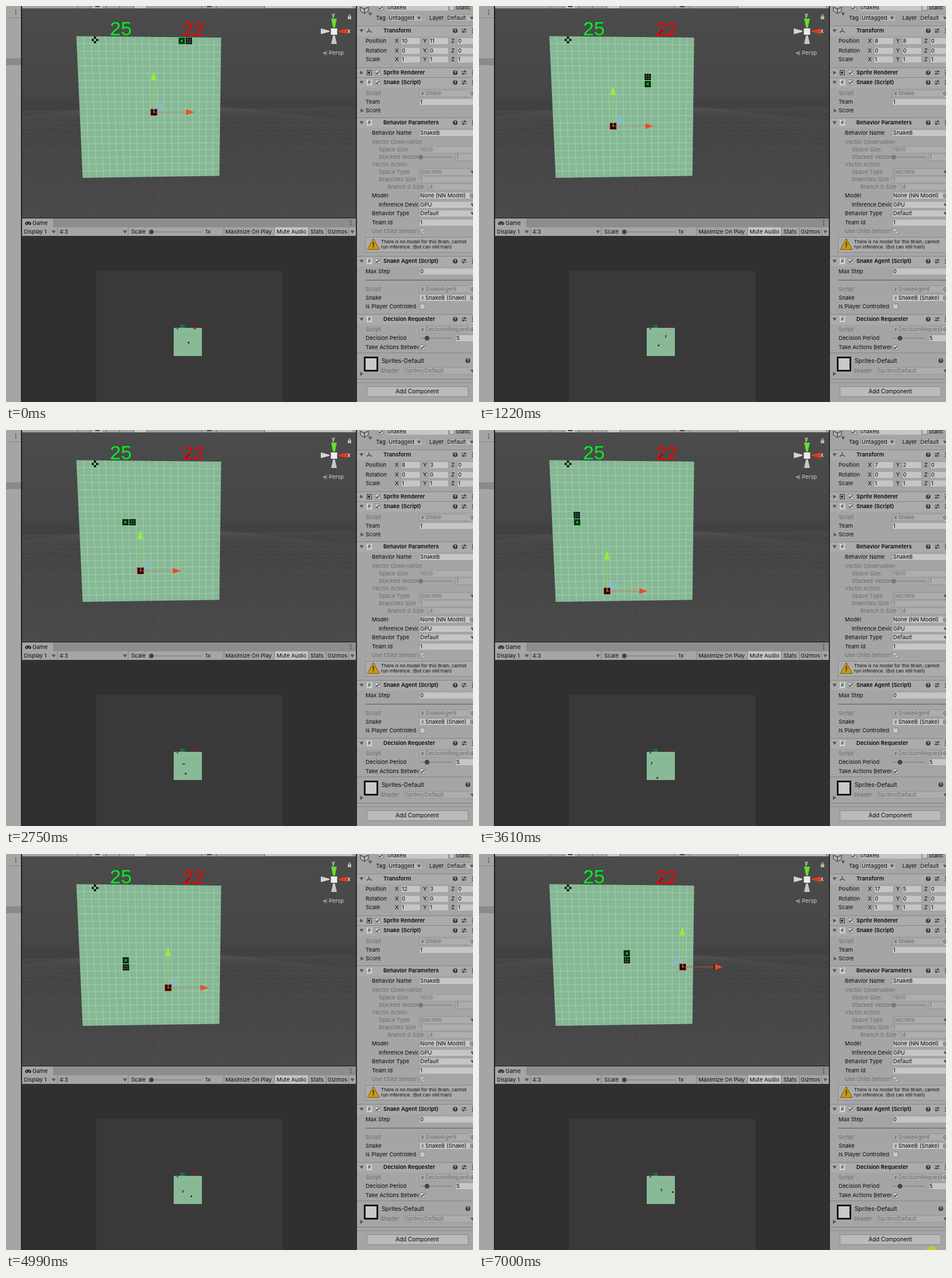
An HTML page with a canvas that plays this animation: 813 by 689 pixels, repeating every 7.08 s.

```html
<!DOCTYPE html>
<html lang="en">
<head>
<meta charset="utf-8">
<title>Snake training in an editor</title>
<style>
  html, body { margin: 0; width: 100%; height: 100%; overflow: hidden; background: #313131; }
  canvas { display: block; }
</style>
</head>
<body>
<canvas id="stage" width="813" height="689"></canvas>
<script>
const stage = document.getElementById('stage');
let g = stage.getContext('2d');
const LOOP = 7080, STEP = 77, PANEL = '#a5a5a5', FIELD = '#c6c6c6', INK = '#0b0b0b', DIM = '#6b6b6b';

// Waypoints: [step, column, row, tail dx, tail dy]
const redPath = [
  [-1, 10, 11], [0, 10, 9], [3, 10, 0], [4, 9, 3], [6, 9, 11], [7, 10, 11], [8, 10, 11],
  [10, 10, 10], [14, 8, 9], [20, 8, 3], [23, 9, 0], [24, 8, 1], [29, 8, 0], [35, 8, 4],
  [42, 9, 4], [46, 7, 2], [47, 7, 1], [51, 8, 2], [59, 10, 4], [64, 12, 3], [65, 12, 5],
  [69, 14, 2], [71, 15, 3], [78, 16, 1], [79, 17, 3], [85, 16, 5], [90, 17, 5], [91, 18, 8]
];
const greenPath = [
  [0, 14, 19, 1, 0], [8, 14, 17, 1, 0], [16, 13, 13, 0, 1], [24, 11, 10, 1, 0], [32, 7, 11, 1, 0],
  [40, 4, 10, 1, 0], [44, 2, 12, 0, 1], [47, 3, 11, 0, 1], [51, 3, 10, 0, 1], [60, 5, 8, -1, 0],
  [65, 6, 9, 0, -1], [71, 10, 7, -1, 0], [79, 10, 6, 1, 0], [86, 8, 8, 1, 0], [91, 10, 10, 0, -1]
];

function along(path, n) {
  let i = path.length - 1;
  while (i > 0 && path[i][0] > n) i--;
  const a = path[i], b = path[i + 1] || a;
  const k = b === a ? 0 : (n - a[0]) / (b[0] - a[0]);
  return {
    x: Math.round(a[1] + (b[1] - a[1]) * k),
    y: Math.round(a[2] + (b[2] - a[2]) * k),
    tx: a[3], ty: a[4]
  };
}

// Grid coordinates to the tilted board
function project(col, row) {
  const u = col / 20, v = row / 20 * (1 - .054 * (1 - row / 20));
  const left = 133.5 - 11 * v, right = 371.5 + 3 * v;
  const bottom = 299 - 3.5 * u, top = 52.5 + 2.5 * u;
  return [left + (right - left) * u + 3 * u * (1 - u), bottom + (top - bottom) * v];
}

function rect(x, y, w, h, color) { g.fillStyle = color; g.fillRect(x, y, w, h); }
function frame(x, y, w, h, color, width = 1) {
  g.strokeStyle = color; g.lineWidth = width; g.strokeRect(x, y, w, h);
}
function poly(color, ...pts) {
  g.fillStyle = color; g.beginPath();
  pts.forEach(p => g.lineTo(...p));
  g.closePath(); g.fill();
}
function line(a, b, color, width = 1) {
  g.strokeStyle = color; g.lineWidth = width;
  g.beginPath(); g.moveTo(...a); g.lineTo(...b); g.stroke();
}
function disc(x, y, r, color) {
  g.fillStyle = color; g.beginPath(); g.arc(x, y, r, 0, 7); g.fill();
}
function text(s, x, y, color = INK, size = 9.6, weight = 400, align = 'left') {
  g.font = `${weight} ${size}px Inter, sans-serif`;
  g.textAlign = align; g.textBaseline = 'middle'; g.fillStyle = color;
  g.fillText(s, x, y + .5);
}
function score(s, x, y, color, size) {
  g.font = `${size}px "Liberation Sans", sans-serif`;
  g.textAlign = 'left'; g.textBaseline = 'alphabetic'; g.fillStyle = color;
  g.fillText(s, x, y);
}
function field(x, y, w, value, color = INK, fill = FIELD) {
  rect(x, y - 6.5, w, 13, fill);
  frame(x + .5, y - 6, w - 1, 12, '#929292');
  const script = value.startsWith('# ');
  if (script) text('#', x + 4, y, '#4d6b56', 7, 600);
  text(value.replace('# ', ''), x + (script ? 11 : 2), y, color);
}
function arrow(x, y, open = true, color = '#555') {
  if (open) poly(color, [x - 3.5, y - 2.5], [x + 3.5, y - 2.5], [x, y + 3]);
  else poly(color, [x - 2.5, y - 3.5], [x + 3, y], [x - 2.5, y + 3.5]);
}
function check(x, y, on = true, color = INK) {
  rect(x - 4.5, y - 4.5, 9, 9, FIELD);
  frame(x - 4.5, y - 4.5, 9, 9, '#858585');
  if (!on) return;
  line([x - 3, y], [x - 1, y + 2.5], color, 1.2);
  line([x - 1, y + 2.5], [x + 3, y - 2.5], color, 1.2);
}
function dots(x, y) { for (const d of [-3.5, 0, 3.5]) rect(x - .8, y + d - .8, 1.6, 1.6, '#333'); }
function help(x, y) { disc(x, y, 4, '#333'); text('?', x, y, '#ddd', 7, 700, 'center'); }
function slider(x, y, w, knob, color = '#444') {
  line([x, y], [x + w, y], '#777', 1.2);
  disc(knob, y, 4, color);
}

function header(title, y, { open = true, box = true } = {}) {
  rect(611, y - 9, 202, 1, '#858585');
  rect(611, y - 8, 202, 17, '#ababab');
  arrow(619, y, open);
  if (box) check(647, y);
  if (/Script|Behavior|Decision/.test(title)) {
    rect(628, y - 5, 9, 10, '#d2d8d2');
    text('#', 632.5, y, '#356b45', 8.5, 700, 'center');
  } else if (box) {
    frame(628.5, y - 4, 8, 8, '#333');
    disc(632, y, 2.2, '#333');
  } else {
    line([632, y - 5], [632, y], '#3c7a3c', 1.5);
    line([632, y], [637, y + 3], '#a33', 1.5);
    line([632, y], [628, y + 3], '#335', 1.5);
  }
  text(title, 657, y, INK, 9.6, 600);
  help(782, y);
  line([793, y - 2], [802, y - 2], '#333'); line([793, y + 2], [802, y + 2], '#333');
  rect(798, y - 4, 1.5, 4, '#333'); rect(795, y, 1.5, 4, '#333');
  dots(812, y);
}

function inspector() {
  rect(610, 0, 203, 689, PANEL);
  rect(609, 0, 2, 689, '#2a2a2a');
  poly('#b5b5b5', [617, 2], [624, -2], [631, 2], [631, 9], [624, 13], [617, 9]);
  for (const p of [[617, 2], [631, 2], [624, 13]]) line([624, 5], p, '#333', 1.3);
  line([617, 2], [617, 9], '#333'); line([617, 9], [624, 13], '#333');
  line([624, 13], [631, 9], '#333'); line([631, 9], [631, 2], '#333');
  arrow(634, 14);
  check(652, 3); field(661, 3, 110, 'SnakeB');
  check(776, 3, false); text('Static', 783, 3);
  text('Tag', 644, 21); field(664, 21, 62, 'Untagged', INK, '#b5b5b5'); arrow(719, 21);
  text('Layer', 737, 21); field(766, 21, 55, 'Default', INK, '#b5b5b5'); arrow(811, 21);

  header('Transform', 43, { box: false });
  header('Sprite Renderer', 116, { open: false });
  header('Snake (Script)', 133);
  header('Behavior Parameters', 203, { box: false });
  header('Snake Agent (Script)', 444);
  header('Decision Requester', 545, { box: false });

  [['Position', 61], ['Rotation', 78], ['Scale', 93]].forEach(([name, y]) => {
    text(name, 626, y);
    ['X', 'Y', 'Z'].forEach((axis, i) => {
      text(axis, 677 + 49 * i, y);
      field(687 + 49 * i, y, 35, name === 'Scale' ? '1' : '0');
    });
  });

  // [label, x, y, value, disabled, value x]
  const rows = [
    ['Script', 626, 152, '# Snake', 1], ['Team', 626, 167, '1'], ['Behavior Name', 637, 221, 'SnakeB'],
    ['Vector Observation', 637, 237, null, 1, 760], ['Space Size', 649, 250, '1600', 1],
    ['Stacked Vectors', 649, 263, null, 1], ['Vector Action', 637, 276, null, 1],
    ['Space Type', 649, 289, 'Discrete', 1], ['Branches Size', 649, 302, '1', 1],
    ['Branch 0 Size', 664, 315, '4', 1, 735], ['Model', 637, 330, 'None (NN Model)'],
    ['Inference Device', 649, 346, 'GPU'], ['Behavior Type', 637, 361, 'Default'],
    ['Team Id', 637, 377, '1'], ['Use Child Sensors', 637, 392, null, 1],
    ['Max Step', 626, 462, '0'], ['Script', 626, 493, '# SnakeAgent', 1],
    ['Snake', 626, 508, '# SnakeB (Snake)'], ['Is Player Controlled', 626, 523, null],
    ['Script', 626, 563, '# DecisionRequester', 1], ['Decision Period', 626, 578, null],
    ['Take Actions Between', 626, 594, null]
  ];
  for (const [name, x, y, value, off, vx = 719] of rows) {
    const color = off ? DIM : INK;
    g.save();
    g.beginPath(); g.rect(611, y - 8, vx - 612, 16); g.clip();
    text(name, x, y, color);
    g.restore();
    if (value !== null) field(vx, y, 100, value, color, off ? '#adadad' : FIELD);
  }
  for (const y of [152, 330, 493, 508, 563]) {
    rect(807, y - 6, 6, 12, '#b8b8b8');
    g.strokeStyle = '#555'; g.lineWidth = 1;
    g.beginPath(); g.arc(812, y, 3.5, 0, 7); g.stroke();
    disc(812, y, 1.3, '#555');
  }
  for (const y of [289, 346, 361]) arrow(812, y);
  arrow(620, 182, false); text('Score', 626, 182);
  slider(722, 263, 56, 722, '#777'); field(782, 263, 40, '1', DIM, '#adadad');
  slider(720, 578, 58, 733); field(782, 578, 40, '5');
  check(725, 392, true, DIM); check(725, 523, false); check(725, 594);

  rect(625, 402, 188, 27, '#acacac'); frame(625.5, 402.5, 200, 26, '#8a8a8a');
  poly('#6b5312', [639.5, 404], [650.5, 424], [628.5, 424]);
  poly('#cb9c08', [639.5, 406], [649, 423], [630, 423]);
  text('!', 639.5, 416, '#222', 12, 700, 'center');
  text('There is no model for this Brain; cannot', 653, 410, INK, 8);
  text('run inference. (But can still train)', 653, 419, INK, 8);
  line([625, 477], [813, 477], '#6e6e6e', 1.5);

  rect(611, 603, 202, 1, '#858585');
  rect(623, 610, 25, 26, '#171717'); rect(626, 613, 19, 20, '#cacaca');
  text('Sprites-Default', 654, 617, INK, 10.3); help(804, 617);
  text('Shader', 652, 635, DIM); field(692, 635, 130, 'Sprites/Default', DIM, '#adadad'); arrow(812, 635);
  arrow(619, 640, false);
  rect(611, 649, 202, 1, '#7c7c7c'); rect(611, 655, 202, 1, '#8a8a8a');
  rect(628, 662, 177, 18, '#bababa'); frame(628.5, 662.5, 176, 17, '#8a8a8a');
  text('Add Component', 716, 671, INK, 9.8, 400, 'center');
}

function sceneView() {
  const sky = g.createLinearGradient(0, 5, 0, 368);
  [[0, '#4b4b4b'], [.4, '#464646'], [.46, '#414141'], [.6, '#444444'], [1, '#4a4a4a']]
    .forEach(([at, c]) => sky.addColorStop(at, c));
  rect(28, 5, 581, 363, sky);
  g.save();
  g.beginPath(); g.rect(28, 172, 581, 196); g.clip();
  for (let i = -16; i <= 16; i++) line([285, 165], [262 + i * 115, 368], 'rgba(160,160,160,.1)');
  for (let k = 1; k < 16; k++) {
    const y = 168 + 200 / (k * 1.25);
    line([28, y + 4], [609, y - 2], 'rgba(160,160,160,.07)');
  }
  g.restore();

  poly('#89ba97', project(0, 0), project(20, 0), project(20, 20), project(0, 20));
  for (let i = 1; i < 60; i++) {
    const main = i % 3 === 0;
    const color = main ? 'rgba(163,212,179,.6)' : 'rgba(118,168,134,.35)';
    line(project(i / 3, 0), project(i / 3, 20), color, main ? 1.4 : .7);
    line(project(0, i / 3), project(20, i / 3), color, main ? 1.4 : .7);
  }
  score('25', 181, 50.5, '#00f020', 34);
  food(2, 19, '#000');

  text('y', 570, 15, '#ddd', 10, 600, 'center');
  text('x', 597, 43, '#ddd', 10, 600, 'center');
  poly('#65e02a', [566, 22], [576, 22], [572.5, 38], [569.5, 38]);
  poly('#e03a20', [595, 39], [595, 49], [579, 45], [579, 43]);
  poly('#d5d5d5', [548, 39], [548, 49], [563, 45], [563, 43]);
  poly('#c8c8c8', [566, 66], [576, 66], [572.5, 51], [569.5, 51]);
  rect(565.5, 39, 11, 11, '#ededed');
  rect(595, 18, 6, 5, '#bbb'); frame(596.5, 15.5, 3, 3, '#bbb');
  line([559, 79], [552, 82], '#bbb'); line([552, 82], [559, 85], '#bbb'); line([553, 82], [559, 82], '#bbb');
  text('Persp', 562, 82, '#d0d0d0');
}

function gameView() {
  rect(28, 368, 581, 17, '#8d8d8d'); rect(28, 368, 581, 1.5, '#2a2a2a');
  rect(28, 370, 54, 15, PANEL);
  rect(35, 375, 7, 5, '#333'); disc(35.5, 378.5, 2.5, '#333'); disc(41.5, 378.5, 2.5, '#333');
  rect(35, 377, 1.5, 1.5, PANEL); rect(40, 377, 1.5, 1.5, PANEL);
  text('Game', 46, 377.5); dots(600, 377);
  rect(28, 385, 581, 15, PANEL); rect(467, 385, 59, 15, '#c4c4c4');
  for (const x of [89, 212, 379, 467, 526, 557, 596]) rect(x, 385, 1, 15, '#7e7e7e');
  [['Display 1', 31], ['4:3', 93], ['Scale', 218], ['1x', 347], ['Maximize On Play', 382],
   ['Mute Audio', 471], ['Stats', 530], ['Gizmos', 560]].forEach(([s, x]) => text(s, x, 392.5));
  for (const x of [83, 207, 603]) arrow(x, 393);
  slider(253, 393, 90, 253);

  rect(28, 400, 581, 289, '#303030');
  rect(157, 461, 324, 228, '#393939');
  rect(292, 560, 49, 49, '#8ebf9c');
  for (let i = 1; i < 20; i++) {
    const d = i * 2.45;
    line([292 + d, 560], [292 + d, 609], 'rgba(110,160,126,.3)', .7);
    line([292, 560 + d], [341, 560 + d], 'rgba(110,160,126,.3)', .7);
  }
  score('25', 303, 560, '#00e622', 7);
  score('22', 327, 560, '#d40000', 7);
  rect(297.5, 560.5, 2, 2, '#111');
}

function chrome() {
  rect(0, 0, 813, 689, '#202020');
  rect(0, 0, 26, 689, PANEL); rect(0, 20, 26, 1, '#858585');
  rect(0, 91, 26, 12, '#8a8a8a'); dots(17, 11);
  rect(28, 0, 581, 5, PANEL); rect(28, 4, 581, 1, '#555');
  for (const x of [124, 146, 174, 197, 222, 245, 340, 366, 450]) rect(x, 0, 1, 4, '#666');
  rect(151, 0, 16, 4, '#c8c8c8'); rect(223, 0, 22, 4, '#c8c8c8');
  rect(155, 0, 8, 2, '#444'); rect(350, 0, 8, 2, '#444'); rect(451, 0, 152, 3, '#c6c6c6');
}

function food(col, row, color) {
  const [x, y] = project(col + .5, row + .5);
  for (const [dx, dy] of [[0, -4], [-4, 0], [4, 0], [0, 4]]) rect(x + dx - 1.5, y + dy - 2, 3.6, 3.6, color);
}

function segment(col, row, color, tint) {
  const lo = .05, hi = .95;
  const at = (a, b) => project(col + a, row + b);
  poly('#040604', at(lo, lo), at(hi, lo), at(hi, hi), at(lo, hi));
  for (const k of [.35, .65]) {
    line(at(k, lo), at(k, hi), tint, .9);
    line(at(lo, k), at(hi, k), tint, .9);
  }
  if (!color) return;
  const [x, y] = at(.5, .5);
  frame(x - 5.5, y - 5.5, 11, 11, color, .9);
  line([x - 2, y], [x + 2, y], color, 1.5);
  line([x, y - 2], [x, y + 2], color, 1.5);
}

function moveHandle(col, row) {
  const [x, y] = project(col + .5, row + .5);
  const side = col < 15 ? 1 : -1;
  poly('rgba(130,190,220,.6)', [x + side, y - 1], [x + side * 16, y - 4], [x + side * 16, y - 16], [x + side, y - 14]);
  segment(col, row, '#e01818', '#321212');
  line([x, y], [x, y - 56], '#8be04a');
  line([x, y], [x + 56, y], side > 0 ? 'rgba(216,113,76,.65)' : '#c8503c');
  poly('#8ff23c', [x - .5, y - 71], [x + 4.5, y - 55], [x - 5.5, y - 55]);
  if (side < 0) poly('#301008', [x + 54, y - 5], [x + 58, y - 4], [x + 58, y + 4], [x + 54, y + 5]);
  poly('#f04a28', [x + 70, y], [x + 56, y - 5], [x + 56, y + 5]);
}

function mini(col, row, color, size) {
  rect(293.2 + col * 2.45 - size / 2, 607.8 - row * 2.45 - size / 2, size, size, color);
}

const still = document.createElement('canvas');
still.width = 813; still.height = 689;
function buildStill() {
  const live = g;
  g = still.getContext('2d');
  chrome(); sceneView(); gameView(); inspector();
  g = live;
}

function draw(n) {
  g.drawImage(still, 0, 0);
  const red = along(redPath, n), shown = along(redPath, n - 1), green = along(greenPath, n);

  score('22', 307, 52, '#f00000', 34);
  if (n > 0) {
    rect(316, 42, 4, 2.5, '#7a0c0c'); rect(313, 46, 4, 2.5, '#7a0c0c');
  }
  segment(green.x + green.tx, green.y + green.ty, null, '#4c7d5a');
  segment(green.x, green.y, '#20c830', '#2a5a36');
  moveHandle(red.x, red.y);

  mini(green.x, green.y, '#10351a', 1.9);
  mini(green.x + green.tx, green.y + green.ty, '#1c2a20', 1.9);
  mini(red.x, red.y, '#5c0c0c', 2.7);

  field(687, 61, 35, String(shown.x));
  field(736, 61, 35, String(shown.y));

  if (n >= 80) {
    const k = (n - 80) / 11;
    disc(772 + 16 * k, 695 - 3 * k, 9.5, '#cbc42a');
  }
}

let last = -1;
function tick() {
  const t = performance.now() % LOOP;
  const n = Math.min(91, Math.floor((t + 20) / STEP));
  if (n !== last) draw(last = n);
  requestAnimationFrame(tick);
}
buildStill();
tick();
</script>
</body>
</html>
```
